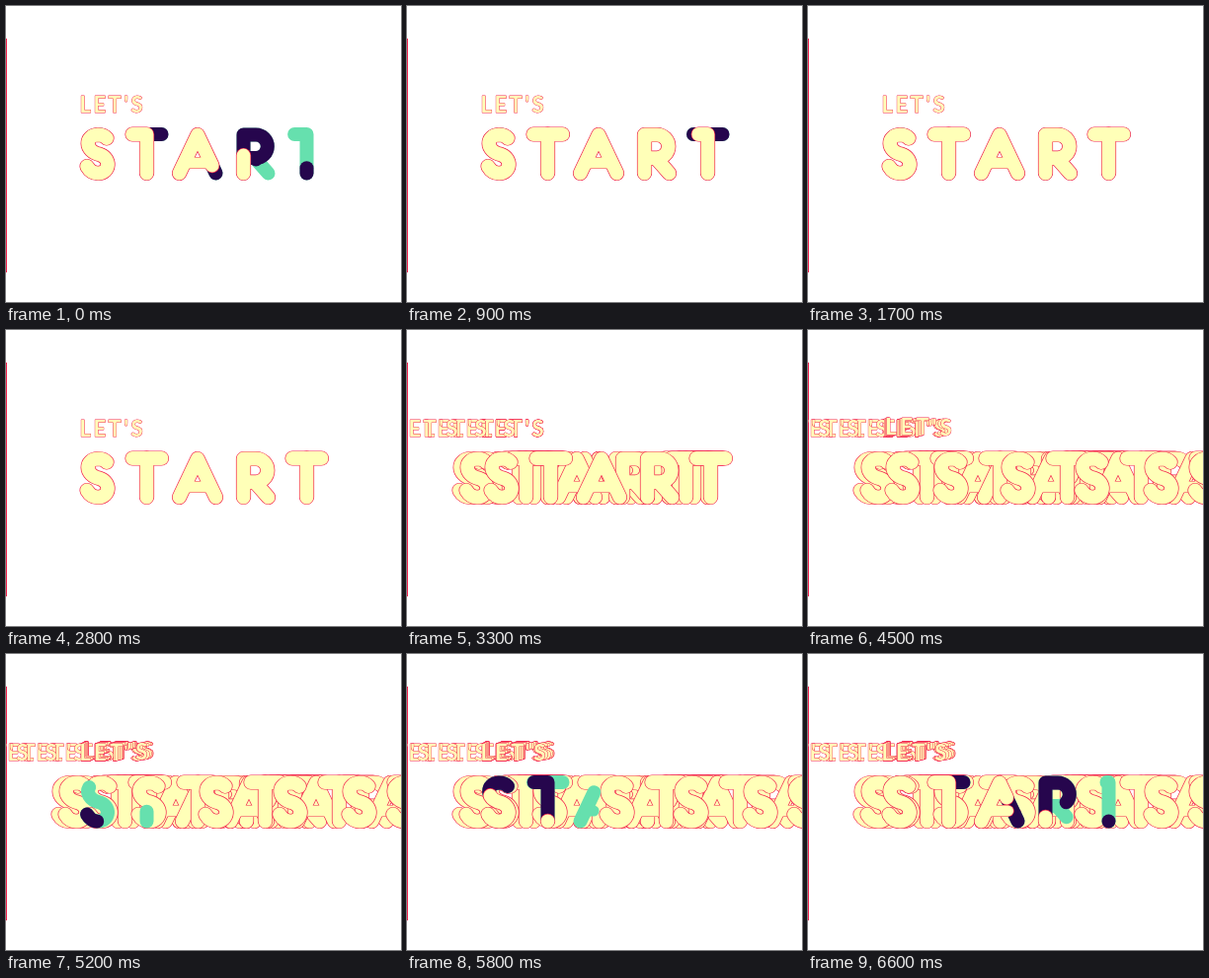
Animation of 400 by 300 pixels, one loop 6.7 s. Source, as an HTML page with a canvas:

```html
<!DOCTYPE html>
<html lang="en">
<head>
<meta charset="utf-8">
<title>Let's start</title>
<style>
html, body { margin: 0; width: 100%; height: 100%; overflow: hidden; background: #fff; }
canvas { display: block; }
</style>
</head>
<body>
<canvas id="stage" width="400" height="300"></canvas>
<script>
const ctx = document.getElementById('stage').getContext('2d');
const LOOP = 6700, STEP = 100, EXIT = 2800;
const TEAL = '#66e0ae', DARK = '#26064d', CREAM = '#ffffb8', RED = '#f4244e';

const clamp = v => Math.max(0, Math.min(1, v));
const ease = p => p < .5 ? 2 * p * p : 1 - 2 * (1 - p) * (1 - p);

// One pen stroke: path, delay after the letter starts, duration, width, delay of the cream pass.
function pen(d, delay, duration, width = 14, lastDelay = delay) {
  const el = document.createElementNS('http://www.w3.org/2000/svg', 'path');
  el.setAttribute('d', d);
  return { path: new Path2D(d), length: el.getTotalLength(), delay, duration, width, lastDelay };
}
const letterT = x => [
  pen(`M${x} 169.5V130H${x - 14.5}`, 0, 500),
  pen(`M${x} 130H${x + 15}`, 500, 200, 14, 950)
];

// Start times of the teal, dark and cream passes.
const letters = [
  { starts: [4680, 4980, 5335], pens: [
    pen('M82 162.5Q86 169.5 93 169.5C106 169 106 154 95 150.5C79 147 80 131 93 130.5Q99 130.5 102 134', 0, 800)] },
  { starts: [5050, 5340, 5790], pens: letterT(142.5) },
  { starts: [5540, 5880, 6235], pens: [
    pen('M175.5 169.5L194 130.5L212.5 169.5', 0, 600),
    pen('M181 159H207', 130, 330, 11)] },
  { starts: [6010, 6195, 6510], pens: [
    pen('M240.5 169.5V130.5H253a11.8 11.8 0 0 1 0 23.6H246H252L265.5 169.5', 0, 700)] },
  { starts: [6270, 6590, 7210], pens: letterT(304.5) }
];

function drawPens(pens, color, progress) {
  const passes = color === CREAM ? [[RED, 1.2], [CREAM, -.2]] : [[color, 0]];
  for (const [style, extra] of passes) {
    ctx.strokeStyle = style;
    for (const p of pens) {
      const part = progress(p);
      if (part < 0) continue;
      ctx.lineWidth = p.width + extra;
      ctx.setLineDash(part < 1 ? [Math.max(.01, part * p.length), 999] : []);
      ctx.stroke(p.path);
    }
  }
  ctx.setLineDash([]);
}

function drawWord(dx) {
  ctx.save();
  ctx.translate(dx, 0);
  for (const l of letters) drawPens(l.pens, CREAM, () => 1);
  ctx.restore();
}

function drawStrokes(time) {
  for (const { starts, pens } of letters)
    [TEAL, DARK, CREAM].forEach((color, i) => drawPens(pens, color, p => {
      const age = time - starts[i] - (i === 2 ? p.lastDelay : p.delay);
      return age < 0 ? -1 : ease(clamp(age / p.duration));
    }));
}

function drawText(text, x, y) {
  ctx.strokeStyle = RED;
  ctx.lineWidth = .9;
  ctx.strokeText(text, x, y);
  ctx.fillStyle = CREAM;
  ctx.fillText(text, x, y);
}

// The small word comes back letter by letter in a short swing to the right.
function drawSwing(time) {
  const word = "LET'S";
  for (let i = 0; i < word.length; i++) {
    const p = (time - 4100 - i * 40) / 1100;
    if (p <= 0 || p > 1) continue;
    const bump = Math.sin(Math.PI * p);
    const x = 74.5 + ctx.measureText(word.slice(0, i)).width;
    drawText(word[i], x + (4 + i * 1.8) * bump, 108 - 2 * bump);
  }
}

// Moving words leave a copy behind at every step.
const wordShift = [0, 0, -14, -29, -22, 3, 52, 120, 195, 265, 310];
function drawTrail(time) {
  for (let at = EXIT; at <= time; at += STEP) {
    const i = (at - EXIT) / STEP;
    if (i < wordShift.length) {
      drawWord(wordShift[i]);
      drawText("LET'S", 74.5 - 29 * Math.max(0, i - 2), 108);
    }
    drawSwing(at);
  }
}

function draw(time) {
  ctx.fillStyle = '#fff';
  ctx.fillRect(0, 0, 400, 300);
  ctx.fillStyle = RED;
  ctx.fillRect(0, 33, 1, 237);
  ctx.lineCap = ctx.lineJoin = 'round';
  ctx.font = '700 22px Lato, sans-serif';
  ctx.letterSpacing = '2.5px';
  if (time < EXIT) {
    drawText("LET'S", 74.5, 108);
    drawStrokes(time + LOOP);
  } else {
    drawTrail(time);
    drawStrokes(time);
  }
}

const begin = performance.now();
function frame() {
  const time = (performance.now() - begin) % LOOP;
  draw(Math.floor(time / STEP) * STEP);
  requestAnimationFrame(frame);
}
frame();
</script>
</body>
</html>
```
